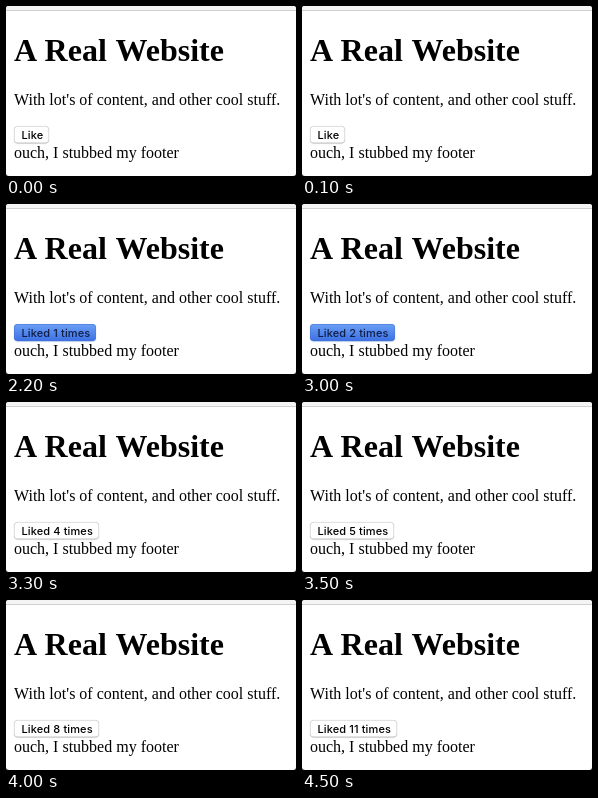
An HTML page that plays this animation: 290x170 px, repeating every 5100 ms.

```html
<!DOCTYPE html>
<html lang="en">
<head>
<meta charset="utf-8">
<title>Like button</title>
<style>
  html, body { margin: 0; width: 100%; height: 100%; overflow: hidden; }
  html { background: #222; }
  body {
    position: relative; border-radius: 3px; background: #fff;
    color: #000; font: 16px "Liberation Serif", Times, serif;
  }
  .bar {
    position: absolute; left: 0; top: 0; width: 100%; height: 5px; box-sizing: border-box;
    background: #f4f4f4; border-bottom: 1px solid #d0d0d0;
  }
  h1, p, footer { position: absolute; left: 8px; margin: 0; white-space: nowrap; }
  h1 { top: 26px; font-size: 32px; line-height: 36px; word-spacing: 1.25px; }
  p { top: 85px; line-height: 18px; }
  footer { top: 138px; line-height: 18px; }
  .like {
    position: absolute; left: 8px; top: 120px; height: 17px; padding: 1px 6px 0 7.5px;
    box-sizing: border-box; border-radius: 4px; background: #fff;
    box-shadow: inset 0 0 0 .5px #c4c4c4, 0 .5px 1px #aaa;
    font: 500 11px/17px Inter, sans-serif; letter-spacing: .12px; white-space: nowrap;
  }
  .like.down {
    background: linear-gradient(#6ba0f6, #3c70e4);
    box-shadow: inset 0 0 0 .5px #4674d2, 0 .5px 1px #7f9fd8;
    color: #101d44;
  }
</style>
</head>
<body>
<div class="bar"></div>
<h1>A Real Website</h1>
<p>With lot's of content, and other cool stuff.</p>
<div class="like">Like</div>
<footer>ouch, I stubbed my footer</footer>
<script>
  const LOOP = 5100, TICK = 100;
  const snap = ms => Math.floor(ms / TICK) * TICK;

  // Evenly spaced clicks; each lands on a tick when the button is let go.
  const burst = (first, gap, count, hold) =>
    Array.from({ length: count }, (_, i) => ({ up: snap(first + i * gap), hold }));

  const clicks = [
    ...burst(1500, 800, 4, TICK),
    ...burst(3300, 200, 2, TICK),
    ...burst(3700, 0, 1, 0),
    ...burst(4050, 150, 4, 0)
  ];
  const like = document.querySelector('.like');
  const start = performance.now();

  function draw(now) {
    const t = Math.max(0, now - start) % LOOP;
    const likes = clicks.filter(c => c.up <= t).length;
    const label = likes ? `Liked ${likes} times` : 'Like';
    if (like.textContent !== label) like.textContent = label;
    like.classList.toggle('down', clicks.some(c => t < c.up && t >= c.up - c.hold));
    requestAnimationFrame(draw);
  }
  draw(start);
</script>
</body>
</html>
```
